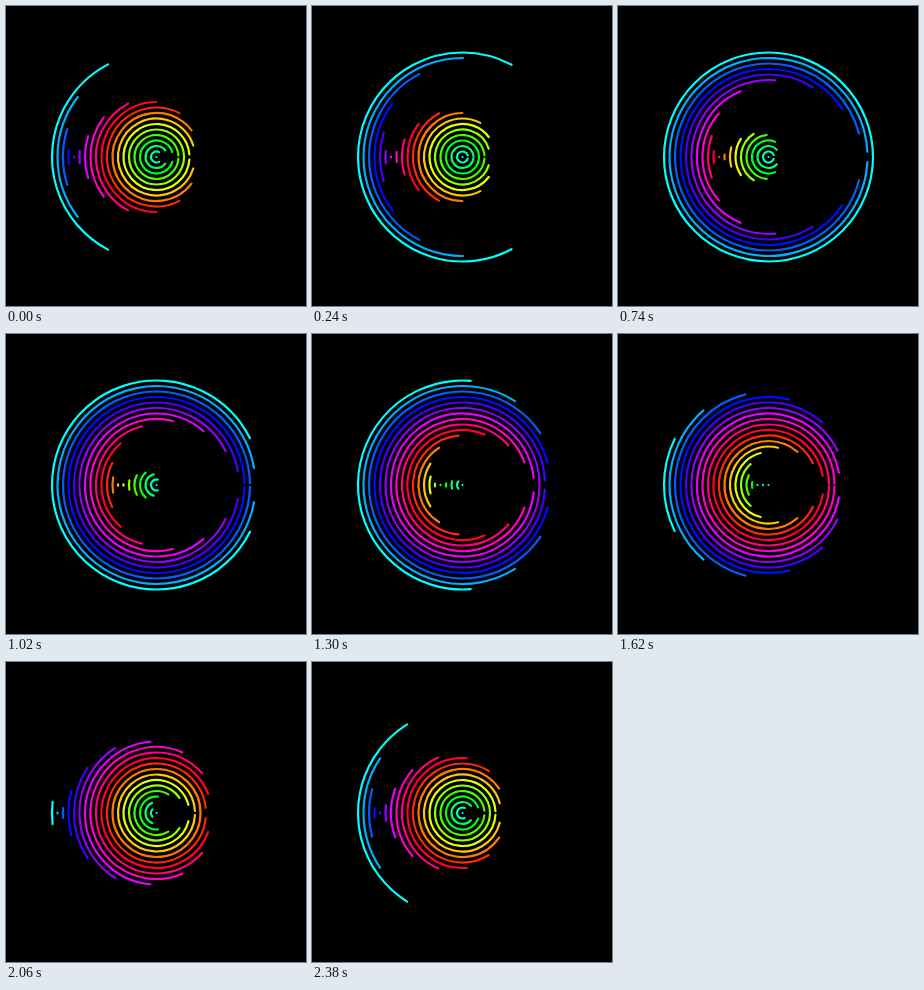
Write an HTML page with a canvas that moves like this. It is 300 by 300 pixels and loops after 2400 ms.

```html
<!DOCTYPE html>
<html lang="en">
<head>
<meta charset="utf-8">
<title>Breathing rainbow arcs</title>
<style>
  html, body { margin: 0; width: 100%; height: 100%; overflow: hidden; background: #000; }
  canvas { display: block; width: 300px; height: 300px; }
</style>
</head>
<body>
<canvas id="stage" width="300" height="300"></canvas>
<script>
const ctx = document.getElementById('stage').getContext('2d');
const LOOP = 2400;
const RINGS = 20;
const SPACING = 5.5;
const LINE = 2.2;
const CENTER = { x: 150.5, y: 151 };
const MIN_SPAN = 0.005;

// Half of the arc's opening, swinging between nothing and a closed circle.
function halfSpan(ring, progress) {
  const phase = 2 * Math.PI * ((ring - 15) / RINGS + progress);
  return Math.max(MIN_SPAN, Math.PI / 2 * (1 - Math.cos(phase)));
}

function ringColor(ring) {
  const hue = (540 - 360 * ring / (RINGS - 1)) % 360;
  return `hsl(${hue}, 100%, 50%)`;
}

function drawRing(ring, progress) {
  ctx.beginPath();
  if (ring === 0) {
    ctx.fillStyle = ringColor(ring);
    ctx.arc(CENTER.x, CENTER.y, LINE / 2, 0, 2 * Math.PI);
    ctx.fill();
    return;
  }
  const span = halfSpan(ring, progress);
  ctx.strokeStyle = ringColor(ring);
  ctx.arc(CENTER.x, CENTER.y, ring * SPACING, Math.PI - span, Math.PI + span);
  ctx.stroke();
}

function draw(time) {
  const progress = (time % LOOP) / LOOP;
  ctx.fillStyle = '#000';
  ctx.fillRect(0, 0, 300, 300);
  ctx.lineWidth = LINE;
  ctx.lineCap = 'round';
  for (let ring = 0; ring < RINGS; ring++) drawRing(ring, progress);
}

function tick() {
  draw(performance.now());
  requestAnimationFrame(tick);
}
tick();
</script>
</body>
</html>
```
